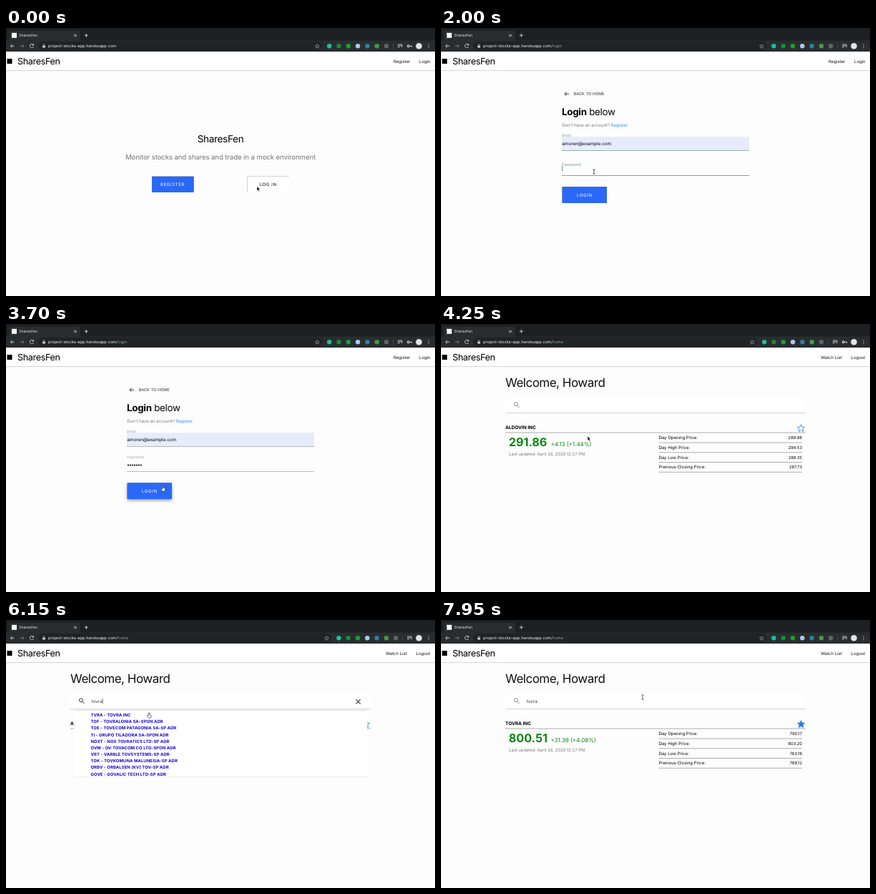
An HTML page that plays this animation: 600 by 375 pixels, repeating every 8 s.

```html
<!DOCTYPE html>
<html lang="en">
<head>
<meta charset="utf-8">
<title>SharesFen</title>
<style>
  html, body { margin: 0; width: 100%; height: 100%; overflow: hidden; background: #fdfdfd; }
  svg { display: block; width: 100vw; height: 100vh; font-family: Inter, "Open Sans", sans-serif; text-rendering: geometricPrecision; }
  text { white-space: pre; }
  .line { fill: none; stroke: currentColor; }
  .card { fill: #fff; filter: drop-shadow(0 .3px .6px #0004) drop-shadow(0 .8px .4px #0006); }
  .button { --lift: 0; filter: drop-shadow(0 .5px .5px #0006) drop-shadow(0 calc(.6px + 1.6px * var(--lift)) calc(.5px + 1.5px * var(--lift)) #0006); }
  .caps { font-size: 6px; letter-spacing: .65px; }
  .blue { fill: #2a69f7; }
  .results { font-size: 5.9px; letter-spacing: .08px; font-weight: 700; fill: #1404cf; }
  .rule { stroke: #777; stroke-width: .6; }
</style>
</head>
<body>
<svg viewBox="0 0 600 375" preserveAspectRatio="none">
  <rect width="600" height="375" fill="#fdfdfd"/>

  <g id="navbar">
    <rect class="card" y="30" width="600" height="29.4"/>
    <rect x="1.5" y="43" width="7" height="7"/>
    <text x="16" y="51.2" font-size="12.6" letter-spacing="-.35">SharesFen</text>
    <g font-size="6" fill="#111">
      <g data-on="0 3850"><text x="542" y="48.7">Register</text><text x="578" y="48.7">Login</text></g>
      <g data-on="3850 8000"><text x="531.2" y="48.7">Watch List</text><text x="573.5" y="48.7">Logout</text></g>
    </g>
  </g>

  <g id="browser">
    <rect width="600" height="18" fill="#1c2022"/>
    <path d="M2 17.5Q4 17.5 4 15V6Q4 3.5 6.5 3.5H101Q103.5 3.5 103.5 6V15Q103.5 17.5 106 17.5H600V33H0V17.5Z" fill="#292d2f"/>
    <rect x="8" y="6.8" width="7" height="7" fill="#fff"/>
    <text x="18.3" y="12.3" font-size="5.2" fill="#e8eaed">SharesFen</text>
    <g class="line" color="#e8eaed" stroke-width=".8">
      <path d="M95.2 8.7l3.6 3.6m0-3.6l-3.6 3.6M109.7 10.3h5.2M112.3 7.7v5.2"/>
      <path d="M12 25.2H6.5m2.4-2.5l-2.5 2.5 2.5 2.5"/>
      <path d="M19.5 25.2H25m-2.4-2.5l2.5 2.5-2.5 2.5" stroke="#85878b"/>
      <path d="M38.2 23.7a2.6 2.6 0 1 0 .2 2.3M38.5 22v2h-2"/>
    </g>
    <rect id="omnibox" x="45" y="18.8" width="397" height="12.8" rx="6.4" fill="#1f2325"/>
    <path d="M51.2 24.6h3.6v3h-3.6z" fill="#cfd1d4"/>
    <path class="line" color="#cfd1d4" stroke-width=".6" d="M52 24.6v-1a1 1 0 0 1 2 0v1"/>
    <text x="59" y="27.2" font-size="5.6" letter-spacing=".04" fill="#f8f9fa">project-stocks-app.herokuapp.com<tspan id="path" fill="#9aa0a6"></tspan></text>
    <g id="tools">
      <path class="line" color="#dadce0" stroke-width="1.5" transform="translate(431.7 21.9) scale(.3)" d="M12 17.3L18.2 21l-1.7-7L22 9.2l-7.2-.6L12 2 9.2 8.6 2 9.2 7.5 14l-1.7 7z"/>
      <g id="extensions"></g>
      <path class="line" color="#dadce0" stroke-width=".8" d="M547.8 23h5.5m-5.5 1.8h5.5m-5.5 1.8h3M553.8 22.5v4.8"/>
      <path d="M541.5 21.5v7.5" stroke="#5f6368" stroke-width=".5"/>
    </g>
    <g id="key" class="line" color="#dadce0" stroke-width="1.1"><circle cx="562.7" cy="25.2" r="1.4"/><path d="M564.1 25.2h3.2v1.6"/></g>
    <circle cx="577.5" cy="25.2" r="4.3" fill="#e4e4e6"/>
    <g fill="#e8eaed"><circle cx="591" cy="22.8" r=".6"/><circle cx="591" cy="25.2" r=".6"/><circle cx="591" cy="27.6" r=".6"/></g>
  </g>

  <g id="welcome" data-on="0 450">
    <text x="300" y="159.7" font-size="13.6" letter-spacing="-.35" text-anchor="middle">SharesFen</text>
    <text x="300" y="184.3" font-size="9.6" letter-spacing="-.09" text-anchor="middle" fill="#757575">Monitor stocks and shares and trade in a mock environment</text>
    <rect class="button blue" x="204" y="207.7" width="58.5" height="22.3" rx=".9"/>
    <text class="caps" x="216" y="221.2" fill="#fff">REGISTER</text>
    <rect id="loginLink" class="button" x="337.7" y="207.7" width="58.3" height="22.3" rx=".9" fill="#fff"/>
    <text class="caps" x="354.7" y="221.2">LOG IN</text>
  </g>

  <g id="login" data-on="450 3850">
    <path class="line" color="#222" stroke-width=".9" d="M179 92.2h-6m2.6-2.7l-2.7 2.7 2.7 2.7"/>
    <text x="185.7" y="94.3" font-size="5.6" fill="#333">BACK TO HOME</text>
    <text x="169" y="122" font-size="13.4" letter-spacing="-.3"><tspan font-weight="700">Login</tspan> below</text>
    <text x="169.3" y="138" font-size="6" fill="#757575">Don't have an account? <tspan fill="#2196f3">Register</tspan></text>
    <text id="emailLabel" font-size="6.3">Email</text>
    <rect data-on="1550 3850" x="169" y="152.3" width="262" height="19" fill="#e6ecfb"/>
    <text id="email" x="169.3" y="164.2" font-size="6.35"></text>
    <path id="emailLine" d="M169 171.5H431"/>
    <text id="passwordLabel" font-size="6.3">Password</text>
    <g id="dots"></g>
    <path id="passwordLine" d="M169 206.5H431"/>
    <rect id="submit" class="button blue" x="169.6" y="222.3" width="62.4" height="22.6" rx=".9"/>
    <text class="caps" x="190" y="236" fill="#fff">LOGIN</text>
    <g data-on="1150 1700">
      <rect x="169" y="172" width="80" height="96.5" rx="1.5" fill="#222628" filter="drop-shadow(0 1px 1px #0005)"/>
      <rect data-on="1500 1700" x="169" y="190.5" width="80" height="15" fill="#414548"/>
      <g id="suggestions" font-size="5.4" font-weight="500" fill="#f1f1f1"></g>
    </g>
  </g>

  <g id="home" data-on="3850 8000">
    <text x="90" y="88.4" font-size="17" letter-spacing="-.5" fill="#111">Welcome, Howard</text>
    <rect class="card" x="90" y="102" width="420" height="22.5" rx=".8"/>
    <g id="lens" class="line" stroke-width="1"><circle cx="104.9" cy="112.2" r="2.5"/><path d="M106.8 114.1l2.8 2.8"/></g>
    <text id="query" x="119.8" y="115.7" font-size="6.2" fill="#333"></text>
    <path id="clear" class="line" color="#333" stroke-width="1.1" d="M489.5 111.2l6.2 6.2m0-6.2l-6.2 6.2"/>
    <g id="stocks"></g>
    <g data-on="5250 6350">
      <rect class="card" x="95" y="126.3" width="410" height="92.8"/>
      <g id="broad" class="results" data-on="5250 5850"></g>
      <g id="narrow" class="results" data-on="5850 6350"></g>
    </g>
  </g>

  <rect id="caret" width=".6" height="7.4" fill="#222"/>
  <g id="cursor" stroke="#fff" stroke-width=".5">
    <path id="arrow" d="M0 0V6.3L1.4 5 2.4 7.2 3.5 6.7 2.5 4.6H4.5Z"/>
    <path id="hand" d="M-.6-2.5Q0-3.1.5-2.5V-.3L2.7.2Q3.3.5 3.2 1.3L2.6 4.5H-.6L-2.7 1.7Q-2.7.7-1.7 1L-.8 1.7Z" stroke="#222" fill="#fff" stroke-width=".6"/>
    <path id="ibeam" d="M-1.5-3.3Q0-3.3 0-2.5Q0-3.3 1.5-3.3M0-2.5V2.7M-1.5 3.4Q0 3.4 0 2.6Q0 3.4 1.5 3.4" fill="none" stroke="#222" stroke-width=".75"/>
  </g>
</svg>
<script>
const LOOP = 8000;
const $ = id => document.getElementById(id);
const label = (x, y, text, extra = '') => `<text x="${x}" y="${y}" ${extra}>${text.replace(/&/g, '&amp;')}</text>`;
const column = (id, x, y, step, items) => {
  $(id).innerHTML = items.map((item, i) => label(x, y + step * i, item)).join('');
};

$('extensions').innerHTML = ['#15c39a', '#168a3d', '#15a135', '#a9c9ee', '#2f7fa0', '#3f9a4c', '#5f6368']
  .map((color, i) => `<circle cx="${452.2 + 13.3 * i}" cy="25.2" r="3.2" fill="${color}"/>`).join('');

column('suggestions', 174, 185, 15, [
  'amoren2013@mail.test', 'amoren@example.com', 'amoren@web.test',
  'antony@example.com', 'adale@example.com', 'a_name@example.com'
]);
column('broad', 118.5, 135.1, 9.17, [
  'T - TB&W INC', 'TL - TOLVIRA SA-ADR', 'TN - TANOMI MOTOR CORP -SPON ADR',
  'TF - TIFFLOE ROLL INDS', 'TX - TRI-MERIDIONAL CORP', 'TZ - TUVEN CORP',
  'TW - TRAMWELD MARKETS INC-CLASS A', 'TQ - TARQUO CORP',
  'TH - TORVE TECHNOLOGIES PLC', 'TI - GRUPO TILADORA SA-SPON ADR'
]);
column('narrow', 118.5, 135.1, 9.17, [
  'TVRA - TOVRA INC', 'TOF - TOVRALONIA SA-SPON ADR', 'TOE - TOVECOM PATAGONIA SA-SP ADR',
  'TI - GRUPO TILADORA SA-SPON ADR', 'NOXT - NOX TOVRATICS LTD-SP ADR',
  'OVM - OV TOVACOM CO LTD-SPON ADR', 'VRT - VARBLE TOVSYSTEMS-SP ADR',
  'TOK - TOVKOMUNA MALUNESIA-SP ADR', 'ORBV - ORBALSEN (KV) TOV-SP ADR',
  'GOVE - GOVALIC TECH LTD-SP ADR'
]);

function stock(span, name, price, change, figures, starred) {
  const titles = ['Day Opening Price:', 'Day High Price:', 'Day Low Price:', 'Previous Closing Price:'];
  const rows = titles.map((title, i) => {
    const y = 161.2 + 13.75 * i;
    return label(304.5, y, title, 'font-size="6"') +
      label(505, y, figures[i], 'font-size="5.8" text-anchor="end"') +
      `<path class="rule" d="M304.5 ${y + 4.8}H505"/>`;
  }).join('');
  return `<g data-on="${span}">
    ${label(90, 146.6, name, 'font-size="6.5" font-weight="700"')}
    <path class="rule" d="M90 152H510"/>
    <path transform="translate(497.3 139.5) scale(.52)" stroke="#2780e3" stroke-width="1.6" fill="${starred ? '#2780e3' : 'none'}" d="M12 17.3L18.2 21l-1.7-7L22 9.2l-7.2-.6L12 2 9.2 8.6 2 9.2 7.5 14l-1.7 7z"/>
    <g fill="#0f8414">
      ${label(94.7, 171, price, 'font-size="16.2" font-weight="700"')}
      ${label(153.4, 171, change, 'font-size="8"')}
    </g>
    ${label(95, 184.2, 'Last updated: April 30, 2020 12:27 PM', 'font-size="5.9" fill="#777"')}
    ${rows}</g>`;
}
const tovra = ['TOVRA INC', '800.51', '+31.39 (+4.08%)', ['790.17', '803.20', '783.16', '769.12']];
$('stocks').innerHTML =
  stock('3950 6450', 'ALDOVIN INC', '291.86', '+4.13 (+1.44%)', ['289.96', '294.53', '288.35', '287.73']) +
  stock('6450 7550', ...tovra) + stock('7550 8000', ...tovra, true);

$('dots').innerHTML = Array.from({ length: 7 }, (_, i) =>
  `<circle cx="${171 + 2.95 * i}" cy="197.5" r="1.1"/>`).join('');
const dots = [...$('dots').children];

const timed = [...document.querySelectorAll('[data-on]')].map(node => [node, ...node.dataset.on.split(' ').map(Number)]);
const within = (t, a, b) => t >= a && t < b;
const show = (node, on) => { node.style.display = on ? '' : 'none'; };
const smooth = p => p * p * (3 - 2 * p);
const ramp = (t, start, length) => smooth(Math.min(1, Math.max(0, (t - start) / length)));

// time, x, y, pointer shape until the next stop
const stops = [
  [0, 351, 221.5, 'arrow'], [50, 351, 221.5, 'hand'], [450, 353, 220, 'arrow'],
  [780, 232, 163, 'ibeam'], [1150, 232, 163, ''], [1300, 225, 170, 'arrow'],
  [1500, 208, 198, 'hand'], [1700, 208, 198, 'arrow'], [1820, 214, 201, 'ibeam'],
  [2550, 214, 201, ''], [3000, 214, 201, 'ibeam'], [3130, 216, 222, 'hand'],
  [3330, 219.5, 229.5, 'hand'], [3850, 219.5, 229.5, 'arrow'], [4250, 205, 157, 'arrow'],
  [4450, 160, 122, 'ibeam'], [4650, 130, 113, 'ibeam'], [5250, 130, 113, ''],
  [5850, 165, 122, 'hand'], [6050, 200, 132.5, 'hand'], [6350, 200, 132.5, 'arrow'],
  [6950, 200, 132.5, 'arrow'], [7400, 503, 147, 'hand'], [7750, 503, 147, 'arrow'],
  [7870, 340, 115, 'ibeam'], [7950, 282, 108, 'ibeam'], [LOOP, 282, 108, 'ibeam']
];

function moveCursor(t) {
  const i = stops.findIndex(stop => stop[0] > t) - 1;
  const [t0, x0, y0, shape] = stops[i], [t1, x1, y1] = stops[i + 1];
  const p = smooth((t - t0) / (t1 - t0));
  $('cursor').setAttribute('transform', `translate(${x0 + (x1 - x0) * p} ${y0 + (y1 - y0) * p})`);
  for (const id of ['arrow', 'hand', 'ibeam']) show($(id), id === shape);
}

function drawField(name, y, t, focus, blur) {
  const float = ramp(t, focus, 200), active = float - ramp(t, blur, 150);
  const mix = grey => `color-mix(in srgb, #2ea879 ${active * 100}%, ${grey})`;
  $(name + 'Label').setAttribute('transform', `translate(169.3 ${y - 11.8 * float}) scale(${1 - .2 * float})`);
  $(name + 'Label').style.fill = mix('#9e9e9e');
  $(name + 'Line').style.stroke = mix('#8e8e8e');
  $(name + 'Line').style.strokeWidth = .6 + .5 * active;
}

// focus start, focus end, key presses, field position, text width
const typed = t => Math.min(7, Math.max(0, Math.floor((t - 2550) / 75) + 1));
const carets = [
  [900, 1550, [900, 1150], 169.5, 158, () => $('email').getComputedTextLength()],
  [1900, 3450, [1900, 2550, 3000], 169.5, 193, t => 2.95 * typed(t)],
  [4950, 6350, [4950, 5250, 5760], 120, 109.8, () => $('query').getComputedTextLength()]
];

function drawCaret(t) {
  const field = carets.find(([from, to]) => within(t, from, to));
  const last = field && Math.max(...field[2].filter(time => time <= t));
  const on = field && (t - last) % 1000 < 500;
  show($('caret'), on);
  if (!on) return;
  $('caret').setAttribute('x', field[3] + field[5](t));
  $('caret').setAttribute('y', field[4]);
}

function draw(t) {
  for (const [node, from, to] of timed) show(node, within(t, from, to));
  $('path').textContent = t < 450 ? '' : t < 3850 ? '/login' : '/home';

  const hasKey = !within(t, 1700, 2150) && t < 5900;
  const shift = hasKey ? 0 : 13.2;
  show($('key'), hasKey);
  $('tools').setAttribute('transform', `translate(${shift})`);
  $('omnibox').setAttribute('width', 397 + shift);

  $('loginLink').style.setProperty('--lift', ramp(t, 50, 250));
  $('submit').style.setProperty('--lift', ramp(t, 3130, 250));

  drawField('email', 164.2, t, 900, 1900);
  drawField('password', 199.3, t, 1900, 3450);
  $('email').textContent = t < 1150 ? '' : t < 1550 ? 'a' : 'amoren@example.com';
  dots.forEach((dot, i) => show(dot, i < typed(t)));

  const strokes = [5250, 5450, 5560, 5660, 5760].filter(time => time <= t).length;
  $('query').textContent = 'tovra'.slice(0, strokes);
  const focus = ramp(t, 4950, 200) - ramp(t, 6350, 250);
  $('lens').style.color = `color-mix(in srgb, #333 ${focus * 100}%, #8a8a8a)`;
  $('clear').style.opacity = focus;

  drawCaret(t);
  moveCursor(t);
}

const start = performance.now();
function tick() {
  draw((performance.now() - start) % LOOP);
  requestAnimationFrame(tick);
}
tick();
</script>
</body>
</html>
```
